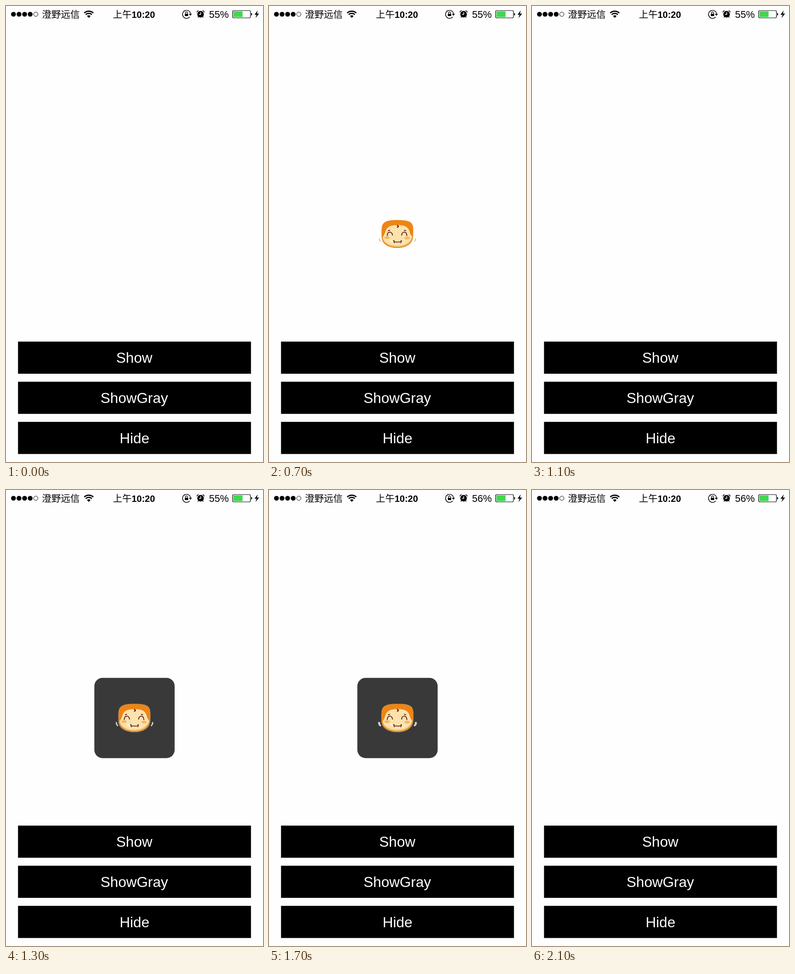
An HTML page that plays this animation: 562x997 px, repeating every 2400 ms.

```html
<!DOCTYPE html>
<html lang="zh">
<head>
<meta charset="utf-8">
<title>Loading face</title>
<style>
html, body { margin: 0; width: 100%; height: 100%; overflow: hidden; background: #fefefe; }
svg { display: block; width: 562px; height: 997px; }
text { font-family: "Liberation Sans", "Noto Sans CJK SC", "Noto Sans CJK", sans-serif; }
.label { font-size: 31.6px; fill: #fff; text-anchor: middle; }
.line { fill: none; stroke: #571313; stroke-width: 1.8; stroke-linecap: round; stroke-linejoin: round; }
.smile { stroke-width: 1.5; }
.ink { fill: none; stroke: #000; }
.panel, .near, .mid, .far, .before, .after { animation: 2400ms step-end infinite; opacity: 0; }
.panel { animation-name: panel; }
.near { animation-name: near; }
.mid { animation-name: mid; }
.far { animation-name: far; }
.before { animation-name: before; }
.after { animation-name: after; }
@keyframes panel { 0%, 87.5% { opacity: 0 } 54.16% { opacity: 1 } }
@keyframes near {
  0%, 16.66%, 45.83%, 62.5%, 83.33% { opacity: 0 }
  8.33%, 41.66%, 58.33%, 75% { opacity: 1 }
}
@keyframes mid {
  0%, 25%, 37.5%, 58.33%, 70.83%, 87.5% { opacity: 0 }
  16.66%, 29.16%, 54.16%, 62.5%, 83.33% { opacity: 1 }
}
@keyframes far {
  0%, 29.16%, 41.66%, 75% { opacity: 0 }
  25%, 37.5%, 70.83% { opacity: 1 }
}
@keyframes before { 0% { opacity: 1 } 62.5% { opacity: 0 } }
@keyframes after { 0% { opacity: 0 } 62.5% { opacity: 1 } }
</style>
</head>
<body>
<svg viewBox="0 0 562 997">
  <defs>
    <path id="outline" d="M281 468C300 468 312 470 314.6 481C316 488 315.2 498 315 505C314 520 300 529 281 529C262 529 247.5 521 246.5 507C246 498 245.6 490 247 482C250 470 262 468 281 468Z"/>
    <g id="head">
      <use href="#outline" fill="none" stroke="#fff3d6" stroke-width="1.2" stroke-dasharray="2 2"/>
      <use href="#outline" fill="#ee8515"/>
      <path d="M247 505Q250 502 252 499L309 499Q312 502 314.5 504C313 520 299 528 281 528C263 528 248 520 247 505Z" fill="#dd982f"/>
      <path d="M281 479C294 479 304 482 307 492Q309 500 313 504C312 517 299 526.5 281 526.5C263 526.5 249 518 248.5 506Q253 499 255 492C258 482 268 479 281 479Z" fill="#f5c887"/>
      <path d="M281 479C294 479 304 482 307 492Q309 500 312.5 504C310 515 299 523.5 281 523.5C263 523.5 251 516 249.5 506Q253 499 255 492C258 482 268 479 281 479Z" fill="#fce2ad"/>
      <path d="M279 479Q284 478.500 284 482Q283 485.500 278.500 485Q281.500 483.500 281 481.500Z" fill="#571313"/>
      <path class="line" d="M258.500 502C259 492 269 492 270 501M290 501C291 492 301 492 301.500 502M261 491.300L264 490.300M296 490.300L299 491.300"/>
    </g>
    <g id="cheeks" fill="#f5b767">
      <ellipse cx="258" cy="506.500" rx="6" ry="3"/>
      <ellipse cx="302" cy="507.500" rx="6" ry="3"/>
    </g>
    <g id="crumbs" fill="#fff8e8">
      <circle cx="267.500" cy="513.500" r="2"/>
      <circle cx="271" cy="515.500" r="1.200"/>
      <circle cx="293.500" cy="519.500" r="1.500"/>
    </g>
    <path id="smile" class="line smile" d="M272 513.500L273.500 512.800Q273 515.500 274 518M273.500 515.300Q281 517.300 288.500 515.300M288.300 518Q289.300 515.500 288.800 512.800L290 513.500"/>
    <path id="arcs" d="M241.500 508.500Q241 512 244 515M320.500 508.500Q321 512 318 515" fill="none" stroke-linecap="round"/>
    <g id="marks">
      <use href="#arcs" stroke="#fff" stroke-width="2.700"/>
      <use href="#arcs" stroke="#b4b4b4" stroke-width="1.400"/>
    </g>
    <g id="chew">
      <use href="#head"/><use href="#cheeks"/><use href="#crumbs"/><use href="#smile"/><use href="#marks"/>
    </g>
  </defs>

  <rect width="562" height="997" fill="#fefefe"/>

  <g id="status">
    <circle cx="16.300" cy="18" r="5.300"/>
    <circle cx="28.500" cy="18" r="5.300"/>
    <circle cx="40.700" cy="18" r="5.300"/>
    <circle cx="52.900" cy="18" r="5.300"/>
    <circle class="ink" cx="65.200" cy="18" r="4.700"/>
    <text x="78.500" y="25.500" font-size="20.700">澄野远信</text>
    <path class="ink" stroke-width="2.700" d="M171.050 15.300A14.600 14.600 0 0 1 190.950 15.300M174.250 18.800A9.900 9.900 0 0 1 187.750 18.800"/>
    <path d="M181 26L177.050 21.800A5.800 5.800 0 0 1 184.950 21.800Z"/>
    <text x="233.700" y="25.500" font-size="20.500" font-weight="500">上午<tspan font-size="20" font-weight="700">10:20</tspan></text>
    <path class="ink" stroke-width="1.400" d="M401.500 24A8.800 8.800 0 1 1 403.600 17"/>
    <path d="M400 17H406.500L403.300 21.500Z"/>
    <rect x="391" y="17" width="7.400" height="5" rx=".6"/>
    <path class="ink" stroke-width="1.200" d="M392.500 17V15A2.200 2.200 0 0 1 396.900 15V17"/>
    <circle cx="425.500" cy="18" r="7.200"/>
    <path class="ink" stroke-width="1.500" stroke-linecap="round" d="M417.500 13.300Q418.300 11 420.700 10.200M433.500 13.300Q432.700 11 430.300 10.200M420.800 23.500L419.800 24.700M430.200 23.500L431.200 24.700"/>
    <path d="M425.800 13.500V18.500H421.800" fill="none" stroke="#fff" stroke-width="1.500"/>
    <g font-size="21.500">
      <text class="before" x="444" y="25.800">55%</text>
      <text class="after" x="444" y="25.800">56%</text>
    </g>
    <rect class="ink" x="495.500" y="10" width="39" height="16" rx="2.500" stroke-width="1.200"/>
    <rect x="497.300" y="11.800" width="20" height="12.400" rx=".8" fill="#43d551"/>
    <path d="M536 15Q538.300 15.500 538.300 18T536 21Z"/>
    <path d="M550.500 9.500L543.500 19H548L545.500 26.500L553.500 16.500H548.700Z"/>
  </g>

  <rect class="panel" x="193.200" y="410.700" width="175.600" height="175.500" rx="18" fill="#393939"/>

  <g class="near">
    <use href="#head" transform="translate(6.200 -.8) scale(.978 1)"/>
    <use href="#cheeks" transform="translate(8.500 -.8) scale(.97 1)"/>
    <use href="#crumbs" transform="translate(2 -1)"/>
    <use href="#smile" transform="translate(73 -.8) scale(.74 1)"/>
  </g>
  <use class="mid" href="#chew"/>
  <g class="far">
    <use href="#chew"/>
    <use href="#marks" transform="translate(-10 0) scale(1.0356 1)"/>
  </g>

  <path d="M26.300 733.700H535.700V803.900H26.300ZM26.300 821.500H535.700V891.700H26.300ZM26.300 909.200H535.700V979.400H26.300Z"/>
  <g class="label">
    <text x="280.500" y="780">Show</text>
    <text x="280.500" y="868">ShowGray</text>
    <text x="281" y="955.500">Hide</text>
  </g>
</svg>
</body>
</html>
```
